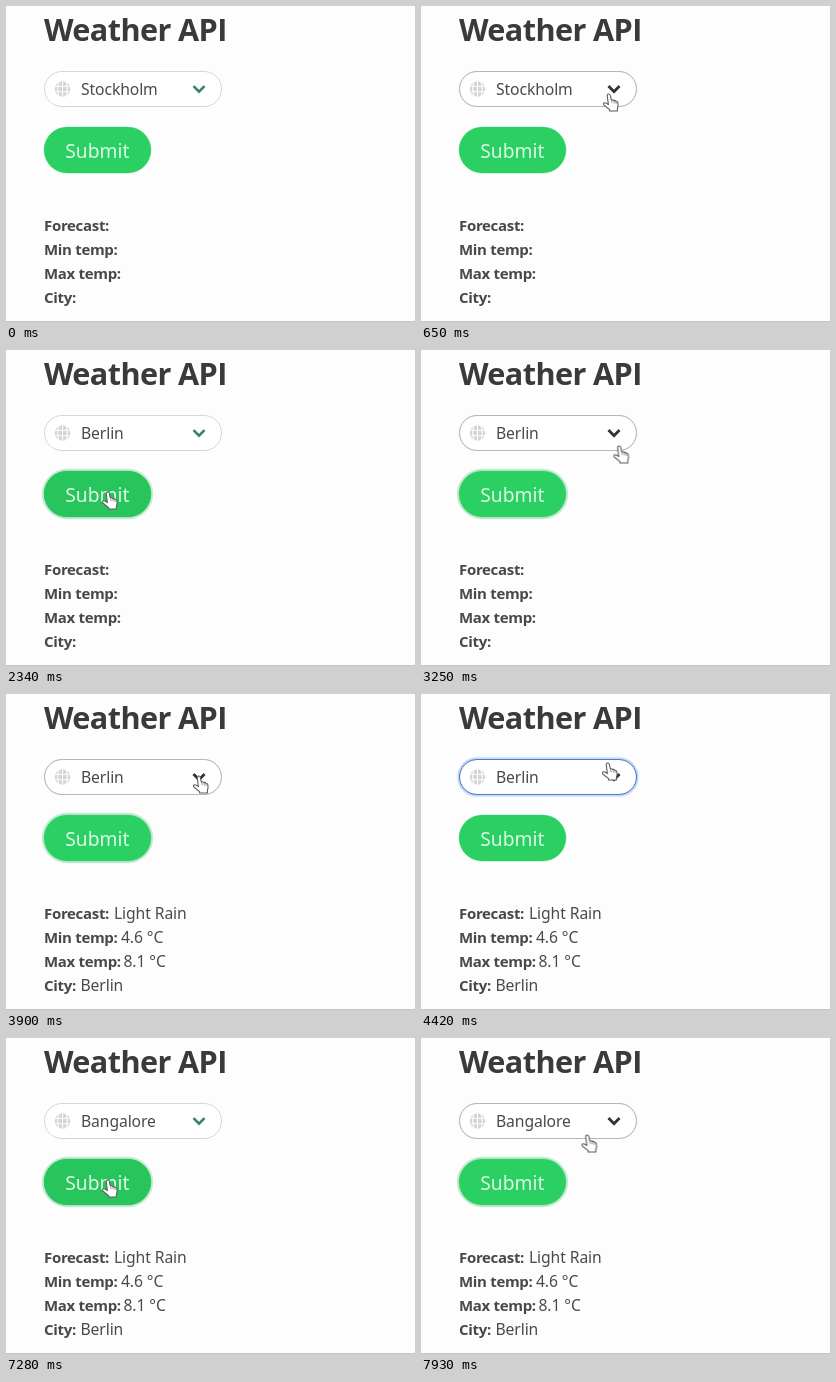
An HTML page that plays this animation: 409 by 316 pixels, repeating every 8 s.

```html
<!DOCTYPE html>
<html lang="en">
<head>
<meta charset="utf-8">
<title>Weather API</title>
<style>
html, body { margin: 0; width: 100%; height: 100%; overflow: hidden; background: #fdfdfd; }
svg { display: block; width: 409px; height: 316px; }
text { font: 15.7px "Noto Sans", "Open Sans", sans-serif; letter-spacing: -.1px; fill: #4a4a4a; white-space: pre; }
.title { font: 700 30.6px "Open Sans", sans-serif; letter-spacing: -.6px; fill: #3a3a3a; }
.label { font: 700 15px "Open Sans", sans-serif; letter-spacing: -.32px; fill: #484848; }
.submit { font-size: 19.2px; letter-spacing: 0; fill: #dcf8e5; }
.arrow { fill: none; stroke: #35806c; stroke-width: 2.6; }
.dark { stroke: #333; }
.box { fill: #fff; stroke: #d6d6d6; }

/* every state shares one 8 s clock */
.timed { animation: 8s step-end -10ms infinite; }
.hover { animation-name: hover; }
.focus { animation-name: focus; }
.press { animation-name: press; }
.ring { animation-name: ring; }
.first { animation-name: first; }
.second { animation-name: second; }
.third { animation-name: third; }
.result { animation-name: result; }
.pointer { animation-name: pointer; }
.path { animation-name: path; }

@keyframes hover {
  0%, 24.375%, 84.5% { opacity: 0; }
  6.5%, 39%, 97.5%, 100% { opacity: 1; }
}
@keyframes focus {
  0%, 27.625%, 89.375%, 100% { opacity: 0; }
  14.625%, 55.25% { opacity: 1; }
}
@keyframes press {
  0%, 34.125%, 92.625%, 100% { opacity: 0; }
  26%, 87.75% { opacity: 1; }
}
@keyframes ring {
  0%, 55.25% { opacity: 0; }
  27.625%, 89.375%, 100% { opacity: 1; }
}
@keyframes first {
  0% { opacity: 1; }
  22.75%, 100% { opacity: 0; }
}
@keyframes second {
  0%, 84.5%, 100% { opacity: 0; }
  22.75% { opacity: 1; }
}
@keyframes third {
  0% { opacity: 0; }
  84.5%, 100% { opacity: 1; }
}
@keyframes result {
  0% { opacity: 0; }
  45.5%, 100% { opacity: 1; }
}
@keyframes pointer {
  0%, 81.25% { opacity: 0; }
  3.25%, 84.5%, 100% { opacity: 1; }
}
@keyframes path {
  0% { transform: translate(246px, 118px); }
  3.25% { transform: translate(246px, 118px); animation-timing-function: steps(3); }
  8.125% { transform: translate(188px, 88px); animation-timing-function: steps(3); }
  13% { transform: translate(133px, 83px); }
  14.625% { transform: translate(130px, 82px); }
  22.75% { transform: translate(119px, 98px); animation-timing-function: steps(3); }
  27.625% { transform: translate(103px, 140px); }
  29.25% { transform: translate(102px, 142px); }
  32.5% { transform: translate(114px, 138px); animation-timing-function: steps(2); }
  35.75% { transform: translate(165px, 110px); }
  39% { transform: translate(191px, 99px); }
  40.625% { transform: translate(198.4px, 96px); }
  43.875% { transform: translate(198px, 92px); animation-timing-function: steps(6); }
  53.625% { transform: translate(188px, 72px); }
  55.25% { transform: translate(187px, 69px); }
  84.5% { transform: translate(118px, 106px); animation-timing-function: steps(3); }
  89.375% { transform: translate(102px, 142px); }
  92.625% { transform: translate(108px, 138px); animation-timing-function: steps(4); }
  99.125%, 100% { transform: translate(166.5px, 97px); }
}
</style>
</head>
<body>
<svg viewBox="0 0 409 316">
  <rect width="409" height="316" fill="#fdfdfd"/>
  <path d="M0 315.5H409" stroke="#c4c4c4"/>
  <text class="title" x="38" y="34.5">Weather API</text>

  <!-- city select -->
  <rect class="box" x="38.5" y="65.5" width="177" height="35" rx="17.5"/>
  <path class="arrow" d="M187.5 80.2l5.5 5.5 5.5-5.5"/>
  <g class="timed hover">
    <rect x="38.5" y="65.5" width="177" height="35" rx="17.5" fill="none" stroke="#b8b8b8"/>
    <path class="arrow dark" d="M187.5 80.2l5.5 5.5 5.5-5.5"/>
  </g>
  <g class="timed focus" fill="none">
    <rect x="37.2" y="64.2" width="179.6" height="37.6" rx="18.8" stroke="#cbdaf4" stroke-width="2"/>
    <rect x="38.5" y="65.5" width="177" height="35" rx="17.5" stroke="#4a7dd0"/>
  </g>
  <circle cx="56.5" cy="83" r="7.8" fill="#d4d4d4"/>
  <path d="M56.5 75v16M48.5 80.3h16M48.5 85.7h16M53 75.5q-2.6 7.5 0 15M60 75.5q2.6 7.5 0 15" fill="none" stroke="#fff" stroke-width="1.1"/>
  <text class="timed first" x="75" y="89">Stockholm</text>
  <text class="timed second" x="75" y="89">Berlin</text>
  <text class="timed third" x="75" y="89">Bangalore</text>

  <!-- submit button -->
  <rect class="timed ring" x="35.8" y="118.8" width="111.4" height="50.4" rx="25.2" fill="#c6e9d2"/>
  <rect x="38" y="121" width="107" height="46" rx="23" fill="#2ad062" stroke="#2ad062" stroke-opacity=".35"/>
  <rect class="timed press" x="38" y="121" width="107" height="46" rx="23" fill="#28c45c"/>
  <text class="submit" x="59.3" y="152.3">Submit</text>

  <!-- forecast -->
  <text class="label" x="38" y="224.5">Forecast:</text>
  <text class="label" x="38" y="248.5">Min temp:</text>
  <text class="label" x="38" y="272.5">Max temp:</text>
  <text class="label" x="38" y="296.5">City:</text>
  <g class="timed result">
    <text x="108" y="224.5">Light Rain</text>
    <text x="115" y="248.5">4.6 °C</text>
    <text x="117.5" y="272.5">8.1 °C</text>
    <text x="74.5" y="296.5">Berlin</text>
  </g>

  <g class="timed pointer">
    <g class="timed path">
      <path d="M-1.8 1.5Q-1.5-.3 0 0 1.1.2 1.4 1.6L2.3 6Q4 5.2 4.7 6.5 6.2 6 6.8 7.3 8.6 7 8.9 9 9.4 12 8.4 14.6V17H.6V15.6L-4.9 11.2Q-6.2 9.8-5 9-3.9 8.4-2.6 9.3L-.6 10.6Z" fill="#fff" stroke="#5c5c5c" stroke-width="1.1" stroke-linejoin="round"/>
      <path d="M2.6 6.4l.6 2.8M5 7l.4 2.4M7 7.8l.2 2" stroke="#777" stroke-width=".8"/>
    </g>
  </g>
</svg>
</body>
</html>
```
